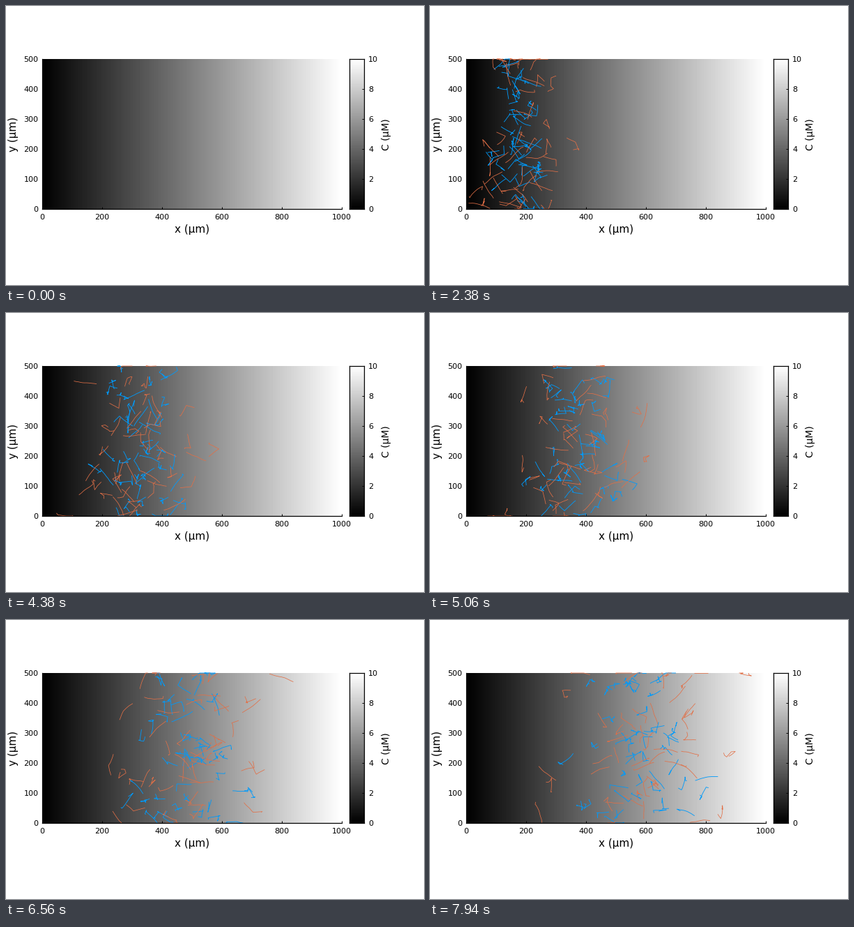
Write a matplotlib script that moves like this. It is 600 px wide and 400 px high and loops after 8000 ms.

```python
import numpy as np
import matplotlib.pyplot as plt
from matplotlib.animation import FuncAnimation
from matplotlib.collections import LineCollection

W, H, DPI = 600, 400, 100
FRAMES, INTERVAL = 128, 62.5
SUB = 3            # simulation steps per frame
TAIL = 6 * SUB     # steps kept in each trail
LEAD = 3           # frames the steering looks ahead
LX, LY = 1000, 500
CELLS = 48
KNOTS = [0, 17, 38, 70, 92, 105, 127]

plt.rcParams.update({"font.family": "DejaVu Sans", "axes.linewidth": 0.9})
rng = np.random.default_rng(12)


def swim(speed, rate, bias, mean, spread, flick):
    """Biased random walk up the gradient; returns positions (step, cell, 2)."""
    rank = np.sort(rng.normal(size=(200, CELLS)), axis=1).mean(axis=0)
    v = speed * np.exp(rng.normal(0, 0.08, CELLS)) / SUB
    x, y = np.zeros(CELLS), rng.permutation(np.linspace(4, LY - 4, CELLS))
    angle = rng.uniform(-2, 2, CELLS)
    backward = rng.random(CELLS) < 0.5
    path = [np.column_stack([x, y])]
    for step in range(1, FRAMES * SUB):
        t = step / SUB + LEAD
        goal = np.interp(t, KNOTS, mean) + rank * np.interp(t, KNOTS, spread)
        k = np.clip(bias + (goal - x) / 35, -2, 2.8)
        turn = rng.random(CELLS) < rate / SUB * np.exp(-k * np.cos(angle))
        if flick:
            # reversals alternate with quarter-turn flicks
            side = np.where(rng.random(CELLS) < 0.5, -1, 1)
            jump = np.where(backward, side * np.pi / 2, np.pi)
            jump = jump + rng.normal(0, 0.22, CELLS)
            backward = backward ^ turn
        else:
            jump = rng.uniform(-np.pi, np.pi, CELLS)
        angle = angle + np.where(turn, jump, rng.normal(0, 0.06, CELLS))
        x = np.clip(x + v * np.cos(angle), 0, LX)
        y = np.clip(y + v * np.sin(angle), 0, LY)
        path.append(np.column_stack([x, y]))
    return np.array(path)


blue = swim(13, 0.55, 0.8, [0, 66, 180, 330, 430, 485, 570],
            [0, 26, 50, 72, 82, 92, 110], True)
orange = swim(12.3, 0.27, 1.0, [0, 82, 190, 330, 430, 515, 600],
              [0, 44, 84, 120, 130, 148, 185], False)


def pixel_axes(left, top, width, height):
    return fig.add_axes([left / W, 1 - (top + height) / H, width / W, height / H])


fig = plt.figure(figsize=(W / DPI, H / DPI), dpi=DPI, facecolor="white")
ramp = np.linspace(0, 1, 430)

ax = pixel_axes(52, 76, 430, 215)
ax.imshow(ramp[None, :], cmap="gray", extent=(0, LX, 0, LY), aspect="auto",
          vmin=0, vmax=1)
ax.spines[["top", "right"]].set_visible(False)
ax.set_xticks(range(0, LX + 1, 200))
ax.set_yticks(range(0, LY + 1, 100))
ax.tick_params(direction="in", length=2.4, width=0.7, labelsize=8)
ax.tick_params(axis="x", pad=5.3)
ax.tick_params(axis="y", pad=3.9)

bar = pixel_axes(493, 76, 21, 215)
bar.imshow(ramp[:, None], cmap="gray", origin="lower", extent=(0, 1, 0, 10),
           aspect="auto", vmin=0, vmax=1)
bar.set_xticks([])
bar.set_yticks(range(0, 11, 2))
bar.yaxis.tick_right()
bar.tick_params(direction="in", length=2.4, width=0.7, labelsize=8, pad=4.5)


def label(px, py, text, size, rotation=0):
    fig.text(px / W, 1 - py / H, text, fontsize=size, rotation=rotation,
             ha="center", va="center")


label(267, 321, "x (μm)", 11)
label(11, 184, "y (μm)", 11, 90)
label(545.6, 184.5, "C (μM)", 10, 90)

trails = []
for path, color, width in ((blue, "#009AFA", 0.62), (orange, "#E26F46", 0.55)):
    lines = LineCollection([], colors=color, linewidths=width, zorder=2,
                           clip_on=False)
    ax.add_collection(lines, autolim=False)
    trails.append((lines, path))


def draw(frame):
    end = frame * SUB
    start = max(0, end - TAIL)
    for lines, path in trails:
        lines.set_segments(list(path[start:end + 1].swapaxes(0, 1))
                           if frame else [])
    return [lines for lines, _ in trails]


anim = FuncAnimation(fig, draw, frames=FRAMES, interval=INTERVAL,
                     init_func=lambda: draw(0), repeat=True, repeat_delay=0)
plt.show()
```
